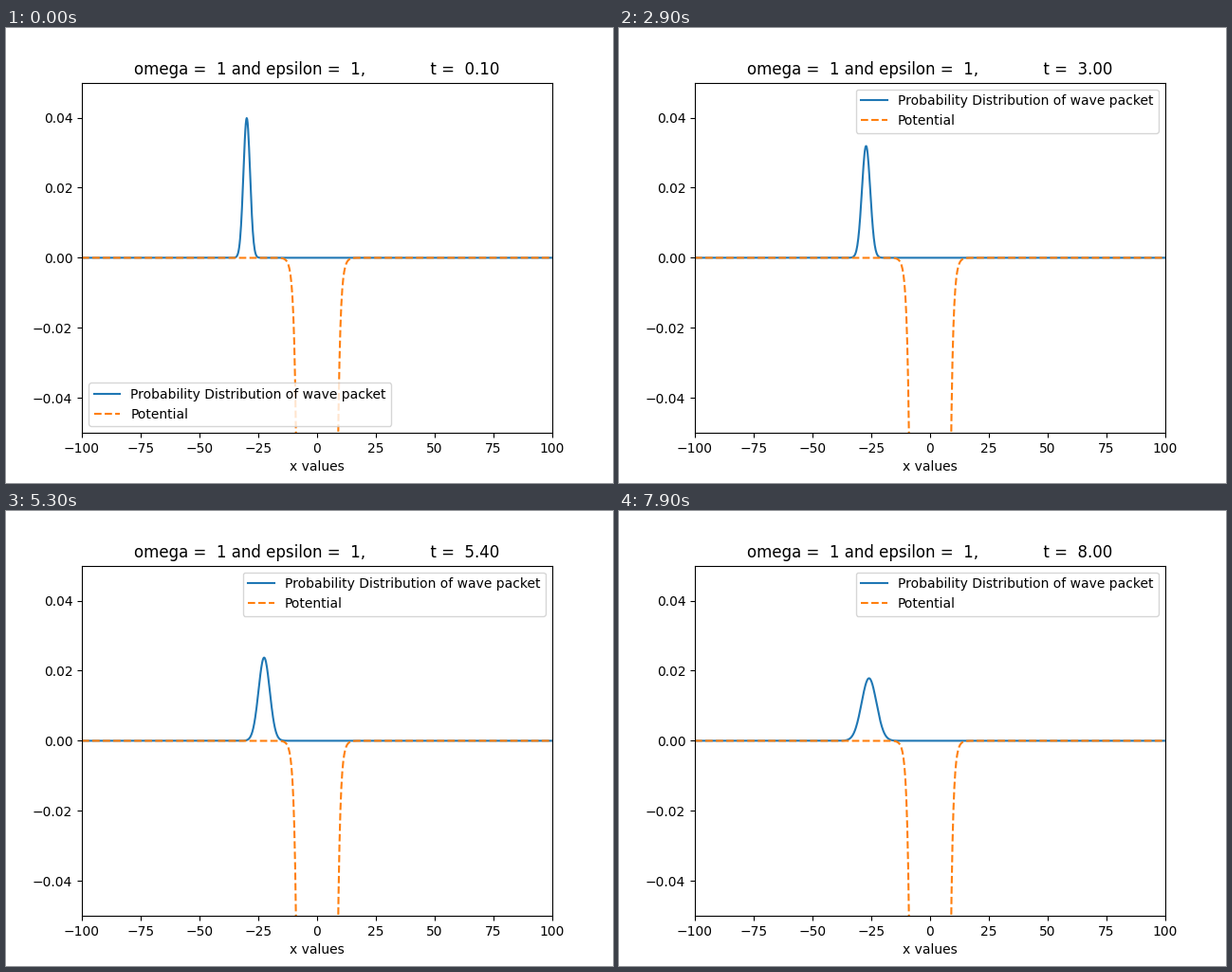
A matplotlib script for the animation above (8 s loop, 640x480 px).

```python
import numpy as np
import matplotlib.pyplot as plt
from matplotlib.animation import FuncAnimation

FRAMES, STEP_MS = 80, 100
DT = 0.1
OMEGA, EPSILON = 1, 1
X0, VAR0, PEAK0 = -30.0, 2.0, 0.0399
SPREAD_TIME = 2 * VAR0
LEGEND_SWITCH = 1.75

x = np.linspace(-100, 100, 1000)


def density(t):
    """Spreading Gaussian packet whose drift is modulated by the drive."""
    centre = X0 + t * (1 - 0.5 * EPSILON * np.sin(OMEGA * t))
    growth = 1 + (t / SPREAD_TIME) ** 2
    return PEAK0 / np.sqrt(growth) * np.exp(-(x - centre) ** 2 / (2 * VAR0 * growth))


def well():
    return -100 / np.cosh(x / 2) ** 2


fig, ax = plt.subplots(figsize=(6.4, 4.8), dpi=100)


def draw(i):
    t = DT * (i + 1)
    ax.clear()
    ax.plot(x, density(t), label="Probability Distribution of wave packet")
    ax.plot(x, well(), "--", label="Potential")
    ax.set_xlim(-100, 100)
    ax.set_ylim(-0.05, 0.05)
    ax.set_xlabel("x values")
    gap = " " * 13
    ax.set_title(f"omega =  {OMEGA} and epsilon =  {EPSILON},{gap}t =  {t:.2f}")
    ax.legend(loc="lower left" if t < LEGEND_SWITCH else "upper right")
    return ax.lines


anim = FuncAnimation(fig, draw, frames=FRAMES, init_func=lambda: draw(0),
                     interval=STEP_MS, repeat=True, repeat_delay=0)

plt.show()
```
